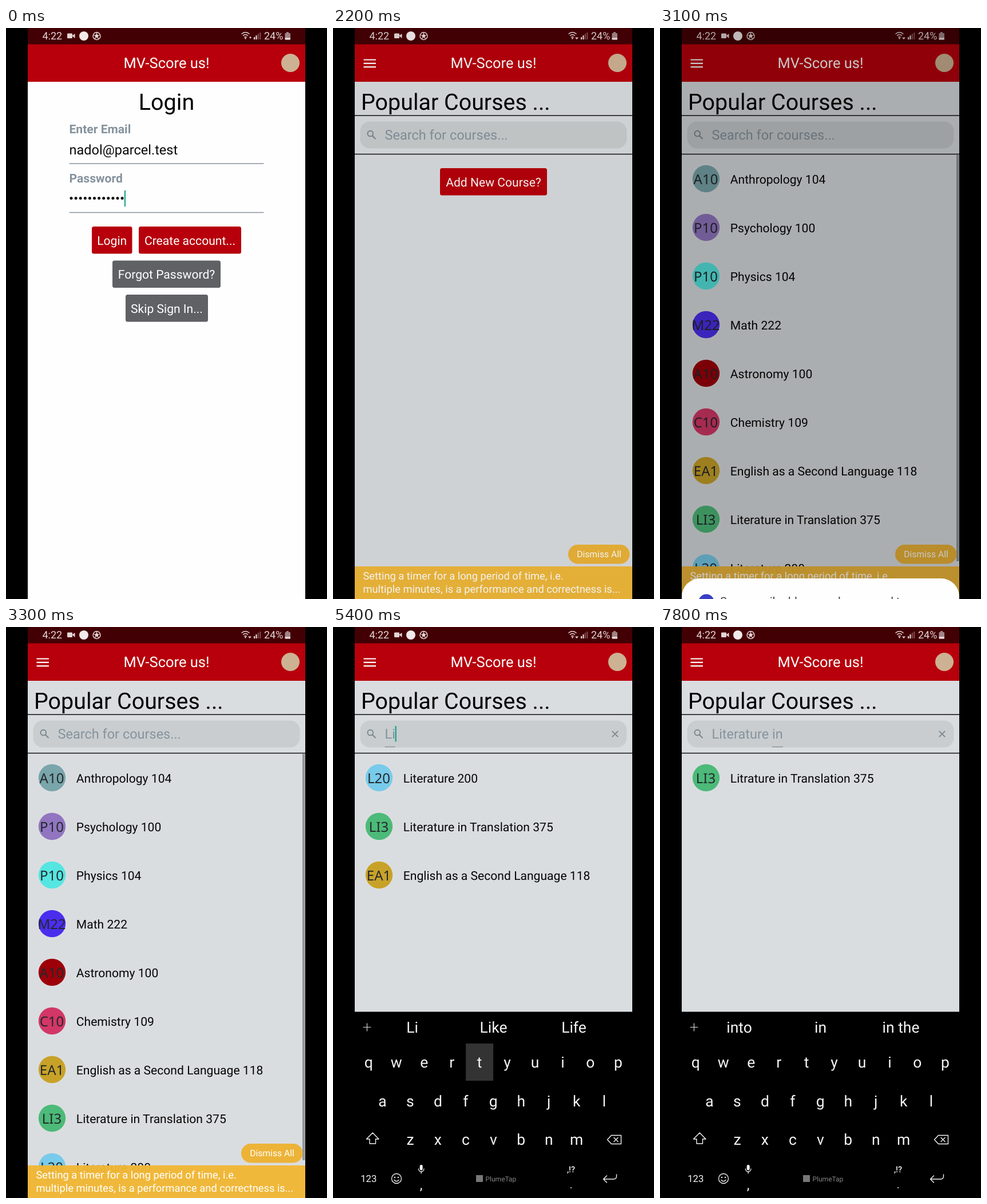
These frames come from a looping animation (561 px wide and 998 px high, 8 s). An HTML page:

```html
<!DOCTYPE html>
<html lang="en">
<head>
<meta charset="utf-8">
<title>Course list login and search</title>
<style>
html, body { margin: 0; width: 100%; height: 100%; overflow: hidden; background: #000; }
svg { display: block; width: 561px; height: 998px; }
text { font-family: Roboto, sans-serif; white-space: pre; text-rendering: geometricPrecision; }
.av { font-family: "Noto Sans", "Open Sans", sans-serif; }
</style>
</head>
<body>
<svg id="stage" viewBox="0 0 561 998" xmlns="http://www.w3.org/2000/svg"></svg>
<script>
const stage = document.getElementById('stage');
const pen = document.createElement('canvas').getContext('2d');
const LOOP = 8000, STEP = 100;
const RED = '#b7000b', GREY = '#86939e', PAGE = '#dadde0', TEAL = '#1aa58e';

// ---- helpers ----
const clamp = v => Math.max(0, Math.min(1, v));
const ease = v => 1 - Math.pow(1 - clamp(v), 2);
const width = (s, size) => {
  pen.font = size + 'px Roboto, sans-serif';
  return pen.measureText(s).width;
};
const rect = (x, y, w, h, fill, r = 0, more = '') =>
  `<rect x="${x}" y="${y}" width="${w}" height="${h}" rx="${r}" fill="${fill}" ${more}/>`;
const circle = (x, y, r, fill, more = '') =>
  `<circle cx="${x}" cy="${y}" r="${r}" fill="${fill}" ${more}/>`;
const line = (d, color, w, more = '') =>
  `<path d="${d}" fill="none" stroke="${color}" stroke-width="${w}" ${more}/>`;
const text = (s, x, y, size, fill, more = '') =>
  `<text x="${x}" y="${y}" font-size="${size}" fill="${fill}" ${more}>${s}</text>`;
const mid = (s, x, y, size, fill, more = '') =>
  text(s, x, y, size, fill, 'text-anchor="middle" ' + more);
const button = (s, x, y, w, fill) =>
  rect(x, y, w, 47.5, fill, 3.5) + mid(s, x + w / 2, y + 31.5, 21.1, '#fff');

// ---- data ----
const courses = [
  ['A10', 'Anthropology 104', '#79a5ab'],
  ['P10', 'Psychology 100', '#9175c0'],
  ['P10', 'Physics 104', '#55e6e2'],
  ['M22', 'Math 222', '#4a2eee'],
  ['A10', 'Astronomy 100', '#9d0009'],
  ['C10', 'Chemistry 109', '#d23767'],
  ['EA1', 'English as a Second Language 118', '#c8a228'],
  ['LI3', 'Literature in Translation 375', '#4cba78'],
  ['L20', 'Literature 200', '#78cbea']
];
const lastHit = ['LI3', 'Litrature in Translation 375', '#4cba78'];
const typed = 'Literature in';
const keyTimes = [5100, 5300, 5500, 5600, 5700, 5900, 6000, 6200, 6400, 6700, 6800, 7400, 7600];
const hints = [
  ["I'm", 'I', ''], ['Love', 'L', 'Let'], ['Li', 'Like', 'Life'], ['Lit', 'Little', 'List'],
  ['Lite', 'Literally', 'Little'], ['Liter', 'Literally', 'Literature'],
  ['Litera', 'Literally', 'Literature'], ['Literat', 'Literature', 'Literate'],
  ['Literatu', 'Literature', 'Literatures'], ['Literatur', 'Literature', 'Literatures'],
  ['Literature', 'Literature', 'Literatures'], ['of', 'and', 'in'],
  ['in', 'I', 'is'], ['into', 'in', 'in the']
];
const wifiFlips = [200, 400, 1200, 4300, 4700, 6900, 7400];
const rows = [['qwertyuiop', 62.3, 770], ['asdfghjkl', 86.5, 837.5], ['zxcvbnm', 135, 905]];
const PITCH = 48.45;

// ---- bars ----
function statusBar(t) {
  const ink = '#e6d6d6';
  const alt = wifiFlips.filter(f => t >= f).length % 2;
  let s = rect(38, 0, 485, 28.5, '#430004');
  s += text('4:22', 63.5, 20, 18, ink);
  s += rect(107, 9.5, 9, 8.5, ink, 1.2) + `<path d="M115.5 13.5L120.5 10V18Z" fill="${ink}"/>`;
  s += circle(136, 14, 8, '#f2eaea');
  s += circle(158.5, 14, 6.5, 'none', `stroke="${ink}" stroke-width="1.4"`);
  s += `<path d="M158.5 10.6L161.8 13L160.5 16.8H156.5L155.2 13Z" fill="${ink}"/>`;
  s += line('M158.5 8V11M164.5 12L161.5 13M162 19.5L160.3 16.6M155 19.5L156.7 16.6M152.5 12L155.5 13', ink, 1.2);
  s += line('M411.5 10.5Q418.5 4.5 425.5 10.5M414 13.5Q418.5 9.5 423 13.5M416.3 16.3Q418.5 14.5 420.7 16.3', ink, 1.5);
  s += circle(418.5, 18.3, 1.2, ink);
  s += alt ? `<path d="M423 16.5H429L426 20Z" fill="${ink}"/>` : circle(427, 16.5, 1.5, ink);
  [4, 7, 10, 12].forEach((h, i) =>
    s += rect(433 + i * 3.4, 20 - h, 2.2, h, ink, 0, i > 1 ? 'opacity=".35"' : ''));
  s += text('24%', 451, 20, 18, ink);
  s += rect(490, 7, 4, 2.5, '#a08587') + rect(487.5, 9, 9.5, 11.5, '#a08587', 1) + rect(487.5, 17, 9.5, 3.5, ink, 1);
  return s;
}

function header(menu) {
  let s = rect(38, 28, 485, 66, RED) + mid('MV-Score us!', 280.5, 70, 25.5, '#fff');
  s += circle(497, 61, 16, '#cdb193');
  if (menu) s += line('M53.5 55.5H75M53.5 61.8H75M53.5 68.1H75', '#fff', 2.2);
  return s;
}

// ---- login page ----
function login(t) {
  let s = rect(38, 94, 485, 904, '#fefefe');
  s += mid('Login', 280.5, 143, 39.5, '#000');
  s += text('Enter Email', 110.5, 184, 21.1, GREY, 'font-weight="700"');
  s += text('nadol@parcel.test', 110.5, 221, 23.5, '#0a0a0a');
  s += text('Password', 110.5, 269.5, 21.1, GREY, 'font-weight="700"');
  s += line('M110.5 237H450.5M110.5 322.5H450.5', GREY, 1.4);
  for (let i = 0; i < 12; i++) s += circle(114 + i * 8.1, 297.5, 2.5, '#0a0a0a');
  if (t < 500) s += rect(206.8, 284, 2.2, 28, TEAL);
  s += button('Login', 150, 347, 70.5, RED);
  if (t >= 1000 && t < 1300) {
    s += `<clipPath id="lg">${rect(150, 347, 70.5, 47.5, '#000', 3.5)}</clipPath>`;
    s += circle(182, 388, t < 1200 ? 28 : 70, '#fff', 'opacity=".18" clip-path="url(#lg)"');
  }
  s += button('Create account...', 232, 347, 179, RED);
  s += button('Forgot Password?', 186, 406.5, 189, '#5f6164');
  s += button('Skip Sign In...', 209, 466, 144, '#5f6164');
  return s;
}

// ---- course page ----
function results(n) {
  if (n === 0) return courses;
  if (n < 3) return [courses[8], courses[7], courses[6]];
  return n < typed.length ? [courses[8], courses[7]] : [lastHit];
}

function searchBox(t, n, lastKey) {
  const query = typed.slice(0, n), end = 90.5 + width(query, 23.5);
  let s = rect(47.5, 163.5, 466, 47, '#c9cdcf', 17);
  s += circle(65.3, 184.6, 4.8, 'none', 'stroke="#7c878f" stroke-width="1.9"');
  s += line('M68.8 188.2L74.5 193.9', '#7c878f', 2.1);
  s += text(n ? query : 'Search for courses...', 90.5, 195, 23.5, GREY);
  if (n) {
    const start = 90.5 + width(query.slice(0, query.lastIndexOf(' ') + 1), 23.5);
    if (end > start) s += line(`M${start} 209.5H${end}`, GREY, 1.4);
    s += line('M487.8 181.8L498.2 192.2M498.2 181.8L487.8 192.2', '#7c878f', 1.8);
  }
  if (t >= 4200 && t < 7800 && (t - lastKey) % 1000 < 500)
    s += rect(end - 0.3, 173, 2.3, 27.5, TEAL);
  return s;
}

function coursePage(t, n, lastKey) {
  let s = rect(38, 94, 485, 904, PAGE);
  s += text('Popular Courses ...', 49, 143, 39.4, '#000');
  s += line('M38 153H523M38 220.5H523', '#111', 1.6);
  s += searchBox(t, n, lastKey);
  if (t < 2800) return s + button('Add New Course?', 187, 245, 187, RED);
  results(n).forEach(([tag, name, color], i) => {
    const y = 263.5 + 85 * i;
    s += circle(80.5, y, 23.7, color);
    s += mid(tag, 80, y + 9, 24, '#24282b', 'class="av"');
    s += text(name, 122.8, y + 8, 21.1, '#050505');
  });
  const bar = 1 - clamp((t - 3600) / 400);
  if (bar) s += rect(518, 222, 4.5, 710, '#92979a', 0, `opacity="${bar}"`);
  return s;
}

function toast() {
  let s = rect(411, 903, 107.5, 33.5, '#ecb337', 16.7) + mid('Dismiss All', 465, 925, 15.7, '#fff');
  s += rect(38, 941, 485, 57, '#f1b735', 0, 'opacity=".97"');
  s += text('Setting a timer for a long period of time, i.e.', 52.5, 964, 18.3, '#fff');
  return s + text('multiple minutes, is a performance and correctness is...', 52.5, 987.3, 18.3, '#fff');
}

// ---- save-password sheet ----
function sheet(t) {
  const dim = t < 2700 ? 0.5 * clamp((t - 2170) / 260) * (t < 2500 ? 0.89 : 1)
                       : 0.5 * (1 - clamp((t - 2900) / 350));
  if (!dim) return '';
  const up = t < 2700 ? Math.pow(clamp((t - 2350) / 120), 2) : 1 - ease((t - 2900) / 350);
  const y = 998 - 196 * up;
  let s = rect(38, 0, 485, 998, '#000', 0, `opacity="${dim}"`);
  if (!up) return s;
  s += rect(38, y, 485, 260, '#fefefe', 32) + circle(81, y + 41, 13.5, '#3a3fc4');
  s += text('Save email address and password to', 105, y + 47, 20, '#444');
  s += text('autofill?', 105, y + 72, 20, '#444');
  s += mid('Cancel', 160, y + 150, 21, '#333') + mid('Save', 401, y + 150, 21, '#333');
  return s;
}

// ---- keyboard ----
function laugh(x, y) {
  let s = circle(x, y, 13.3, '#fcc72e');
  s += line(`M${x - 8} ${y - 3}q3 -4 6 0M${x + 2} ${y - 3}q3 -4 6 0`, '#5d3a12', 1.8);
  s += `<path d="M${x - 8} ${y + 1}h16q-1 9 -8 9t-8 -9z" fill="#5d3a12"/>`;
  s += rect(x - 6.5, y + 1, 13, 2.8, '#fff');
  for (const d of [-1, 1])
    s += `<ellipse cx="${x + d * 12}" cy="${y + 3}" rx="3" ry="4.6" fill="#4fb4ee" transform="rotate(${d * -35} ${x + d * 12} ${y + 3})"/>`;
  return s;
}

function keyboard(t, n) {
  const up = ease((t - 4100) / 260);
  if (!up) return '';
  const ink = '#f4f4f4', thin = '#d8d8d8', caps = n === 0;
  const hit = keyTimes.findIndex(k => t >= k - STEP && t <= k);
  const down = hit < 0 ? '' : typed[hit].toLowerCase();
  let s = rect(38, 672.5, 485, 330, '#000');
  s += line('M52.5 699.5H66.5M59.5 692.5V706.5', thin, 1.2);
  hints[n].forEach((h, i) => {
    const room = i === 1 ? 114 : 86;
    const size = Math.min(26.5, 26.5 * room / Math.max(1, width(h, 26.5)));
    s += mid(h, [138.5, 280.5, 421][i], 700 + size * 0.335, size, ink);
  });
  if (caps) s += laugh(421, 699.5);
  for (const [keys, x0, y] of rows) {
    [...keys].forEach((k, i) => {
      const x = x0 + i * PITCH;
      if (k === down) s += rect(x - 24, y - 42, 48, 65, '#333');
      s += mid(caps ? k.toUpperCase() : k, x, y, 26.5, ink);
    });
  }
  const join = 'stroke-linejoin="round" stroke-linecap="round"';
  s += line('M69.3 884L80 895H74.5V903H64V895H58.5Z', ink, 1.4, join);
  if (caps) s += line('M60 908H79', ink, 1.4);
  s += line('M479.5 896L486.5 888.5H503.5V903.5H486.5ZM491 892.5L498 899.5M498 892.5L491 899.5', ink, 1.4, join);
  s += mid('123', 62.3, 970, 16.8, ink);
  s += circle(111, 964, 8.5, 'none', `stroke="${ink}" stroke-width="1.3"`);
  s += circle(108, 962, 1.2, ink) + circle(114, 962, 1.2, ink) + line('M106.5 966Q111 971.5 115.5 966', ink, 1.3);
  s += rect(151.7, 940, 5, 9.5, ink, 2.5) + line('M149.3 946.5Q149.8 952 154.2 952T159 946.5M154.2 952V955.5', ink, 1.3);
  s += mid(',', 154, 983, 24, ink) + mid('.', 416, 981, 18, ink);
  s += mid(',!?', 416, 953, 14.5, ink, 'font-weight="500"');
  s += rect(250, 958, 12, 12, '#777') + text('PlumeTap', 266.5, 969, 12, '#858585');
  s += line('M495.5 957V960Q495.5 965 490.5 965H472.5M478.5 959L472.5 965L478.5 971', ink, 1.4, join);
  return `<g transform="translate(0 ${326 * (1 - up)})">${s}</g>`;
}

function draw(t) {
  const n = keyTimes.filter(k => t >= k).length;
  const inside = t >= 1900;
  let s = rect(0, 0, 561, 998, '#000');
  s += inside ? coursePage(t, n, n ? keyTimes[n - 1] : 4200) : login(t);
  s += header(inside) + statusBar(t);
  if (t >= 1500 && t < 4200) s += toast();
  s += sheet(t) + keyboard(t, n);
  stage.innerHTML = s + rect(0, 0, 38, 998, '#000') + rect(523, 0, 38, 998, '#000');
}

let shown = -1;
const begin = performance.now();
function tick(now) {
  const t = Math.floor(Math.max(0, now - begin) % LOOP / STEP) * STEP;
  if (t !== shown) draw(shown = t);
  requestAnimationFrame(tick);
}
tick(begin);
</script>
</body>
</html>
```
